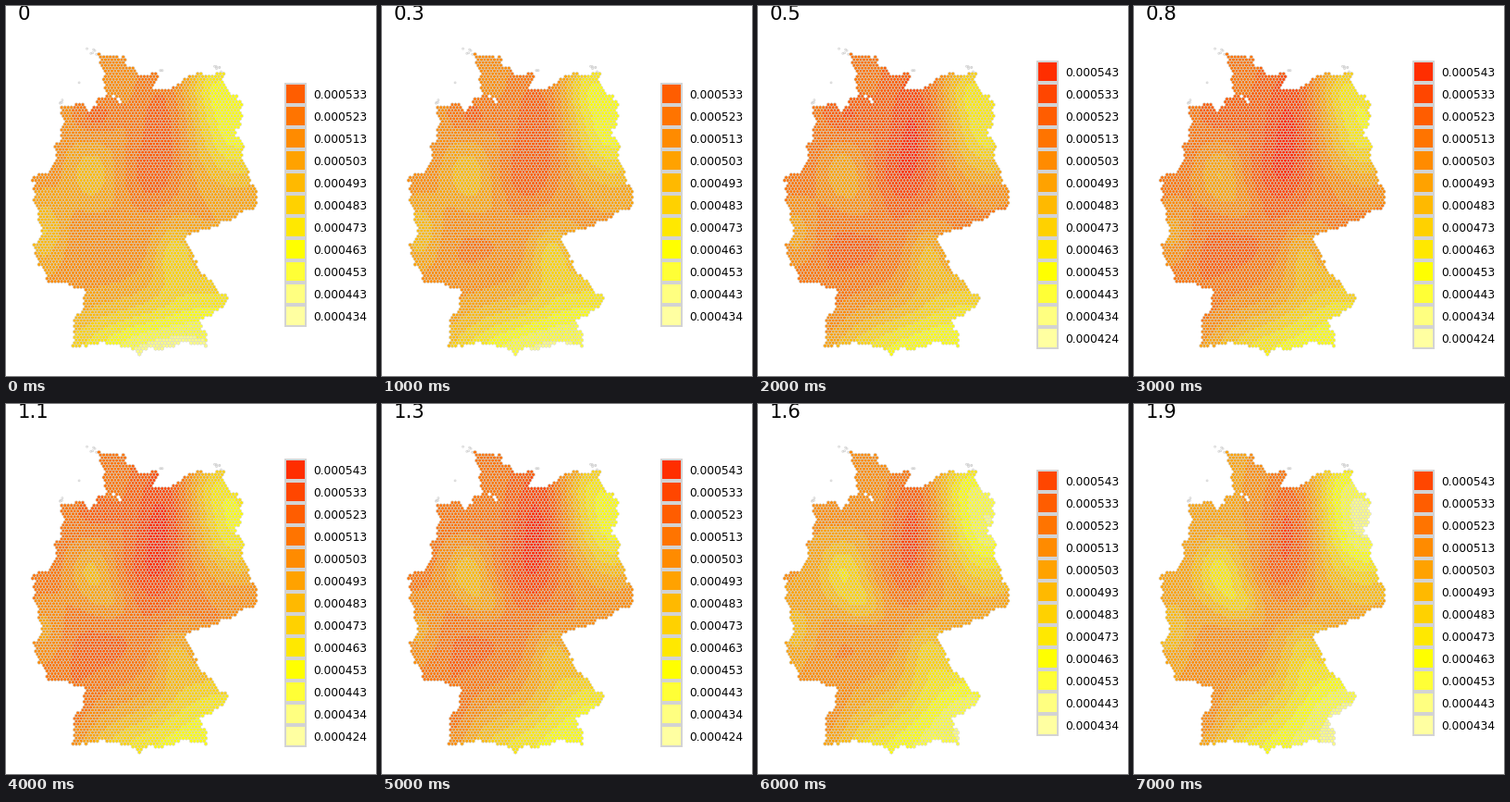
These frames come from a looping animation (400x400 px, 8000 ms). A matplotlib script:

```python
import numpy as np
import matplotlib.pyplot as plt
from matplotlib.animation import FuncAnimation
from matplotlib.collections import PolyCollection
from matplotlib.patches import Rectangle
from matplotlib.path import Path

SIZE, DPI, FRAMES = 400, 100, 8
PX = 72 / DPI  # points per pixel
GREY = "#d3d3d3"
PITCH = 3.5
rng = np.random.default_rng(4)

# Key corners of the country, clockwise from the far north
COAST = [
    (98, 52), (127, 54), (131, 58), (129, 63), (138, 67), (140, 72),
    (155, 75), (164, 71), (165, 78), (157, 90), (170, 90), (182, 88),
    (196, 78), (208, 72), (222, 76), (228, 69), (236, 72), (233, 79),
    (240, 92), (255, 103),
]
BORDER = [
    (256, 120), (248, 138), (257, 152), (255, 160), (263, 184), (271, 201),
    (270, 218), (252, 222), (248, 229), (222, 239), (193, 250), (202, 266),
    (208, 285), (222, 297), (229, 308), (239, 315), (237, 325), (226, 331),
    (208, 341), (217, 356), (218, 367), (212, 366), (192, 363), (180, 370),
    (147, 372), (144, 377), (136, 370), (104, 363), (93, 367), (71, 369),
    (74, 342), (88, 307), (46, 298), (35, 276), (30, 258), (38, 249),
    (35, 224), (28, 211), (32, 203), (27, 185), (48, 181), (56, 158),
    (48, 154), (60, 145), (62, 121), (57, 107), (84, 106), (90, 115),
    (100, 98), (114, 97), (130, 110), (122, 100), (108, 95), (104, 80),
    (108, 75), (104, 66),
]
# Island groups: x, y, spread, count
ISLANDS = [(93, 49, 2.5, 6), (61, 104, 2, 4), (79, 83, 0.5, 1),
           (168, 70, 1, 3), (228, 65, 2.5, 7)]

# Hills and hollows: x, y, width, height, amount at start, amount at end
BUMPS = [
    (168, 132, 20, 50, 2.2, 3.4),
    (152, 185, 20, 24, 1.2, 1.0),
    (98, 118, 16, 14, 2.0, 0.0),
    (100, 265, 35, 25, 0.5, 0.9),
    (75, 345, 18, 35, 0.0, 1.8),
    (250, 130, 32, 42, -5.2, -6.2),
    (225, 85, 22, 22, -2.4, -2.0),
    (92, 182, 18, 24, -2.2, -3.4),
    (115, 215, 16, 16, -0.3, -2.2),
    (42, 245, 16, 26, -2.6, -1.6),
    (182, 268, 16, 26, -2.6, -1.6),
    (160, 385, 70, 40, -7.0, -4.0),
    (235, 330, 45, 45, -3.0, -5.2),
]

# Pale yellows first, then yellow down to red
PALETTE = np.array(
    [(1, 1, b) for b in (0.63, 0.5, 0.21)]
    + [(1, 1 - k / 11, 0) for k in range(12)])


def roughen(corners, step=4, size=1.1):
    """Break each side into short pieces and shake them a little."""
    points = []
    for a, b in zip(corners, corners[1:] + corners[:1]):
        a, b = np.array(a, float), np.array(b, float)
        n = max(1, round(np.hypot(*(b - a)) / step))
        for i in range(n):
            shake = rng.normal(0, size, 2) if i else 0
            points.append(a + (b - a) * i / n + shake)
    return np.array(points)


def hex_grid():
    row = PITCH * np.sqrt(3) / 2
    centres = np.array([(20 + PITCH * (i + j % 2 / 2), 40 + row * j)
                        for j in range(120) for i in range(75)])
    land = Path(roughen(COAST + BORDER))
    return centres[land.contains_points(centres)]


def hexagons(centres, pitch):
    angle = np.pi / 6 + np.arange(6) * np.pi / 3
    ring = np.column_stack([np.cos(angle), np.sin(angle)]) * pitch / np.sqrt(3)
    return centres[:, None, :] + ring


def field(points, s):
    """Class value at each point, s running from 0 to 1."""
    x, y = points.T
    z = 8 - 0.6 * s + 0.5 * np.sin(np.pi * s)
    for bx, by, w, h, start, end in BUMPS:
        amount = start + (end - start) * s
        z = z + amount * np.exp(-((x - bx) / w) ** 2 / 2
                                - ((y - by) / h) ** 2 / 2)
    return z


def class_range(step):
    low = -1 if 2 <= step <= 5 else 0
    high = 10 if step < 2 else 11
    return low, high


cells = hex_grid()
islets = np.vstack([rng.normal((x, y), spread, (n, 2))
                    for x, y, spread, n in ISLANDS])

fig = plt.figure(figsize=(SIZE / DPI, SIZE / DPI), dpi=DPI, facecolor="white")
ax = fig.add_axes([0, 0, 1, 1])
ax.set_xlim(0, SIZE)
ax.set_ylim(SIZE, 0)
ax.axis("off")

ax.add_collection(PolyCollection(hexagons(islets, 1.8), facecolors="none",
                                 edgecolors=GREY, linewidths=0.8 * PX))
country = PolyCollection(hexagons(cells, PITCH), edgecolors=GREY,
                         linewidths=0.55 * PX)
ax.add_collection(country)
title = ax.text(12.6, 15.4, "", fontsize=21.33 * PX, family="DejaVu Sans")

legend = []
for _ in range(13):
    box = ax.add_patch(Rectangle((302, 0), 22, 22, ec=GREY, lw=2 * PX))
    label = ax.text(332.3, 0, "", fontsize=12.2 * PX, family="DejaVu Sans")
    legend.append((box, label))


def update(step):
    low, high = class_range(step)
    z = field(cells, step / (FRAMES - 1))
    classes = np.clip(np.rint(z), low, high).astype(int)
    country.set_facecolor(PALETTE[classes - low])
    title.set_text(f"{round(step * 4 / 15, 1):g}")

    top = 215 - 12 * (high - low)
    for i, (box, label) in enumerate(legend):
        level = high - i
        shown = level >= low
        box.set_visible(shown)
        label.set_visible(shown)
        if shown:
            y = top + 24 * i
            box.set_y(y - 11)
            box.set_facecolor(PALETTE[level - low])
            label.set_y(y + 5)
            label.set_text(f"0.000{round(433.55 + 9.93 * level)}")
    return []


anim = FuncAnimation(fig, update, frames=FRAMES, interval=1000,
                     repeat=True, repeat_delay=0, blit=False)
plt.show()
```
